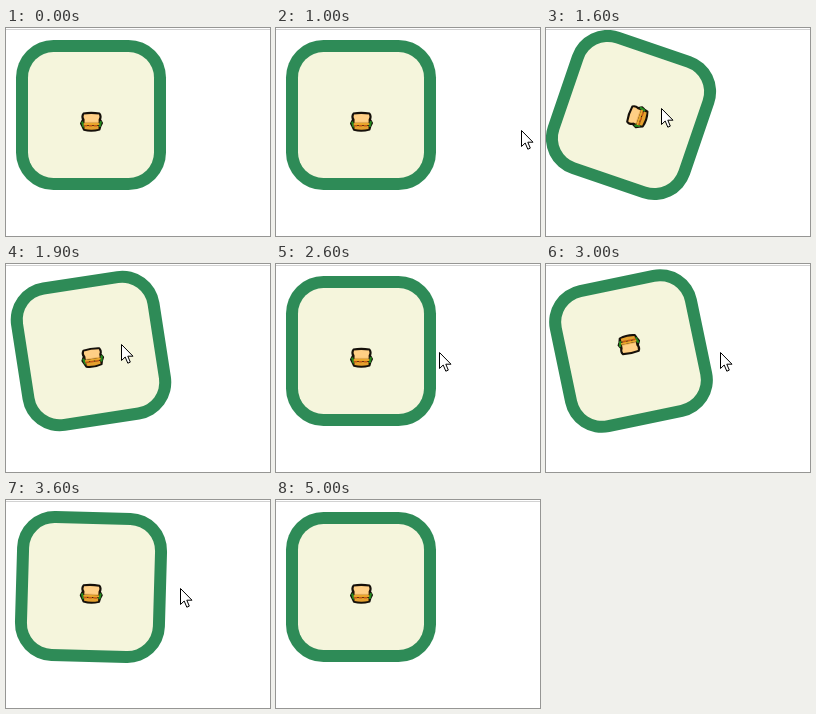
Animation, 264 px wide and 208 px high, one loop 5300 ms. Source, as an HTML page:

```html
<!DOCTYPE html>
<html lang="en">
<head>
<meta charset="utf-8">
<title>Spinning sandwich</title>
<style>
html, body { margin: 0; width: 100%; height: 100%; overflow: hidden; background: #fff; }
svg { display: block; width: 264px; height: 208px; }
</style>
</head>
<body>
<svg viewBox="0 0 264 208">
  <clipPath id="page"><path d="M0 2H264V208H0z"/></clipPath>
  <path d="M0 1.5H264" stroke="#d2d2d2"/>
  <g clip-path="url(#page)">
    <g id="card">
      <rect x="10" y="12" width="150" height="150" rx="37.5" fill="#2e8b57"/>
      <rect x="22" y="24" width="126" height="126" rx="25.5" fill="#f5f5dc"/>
      <g stroke-linejoin="round" stroke-linecap="round">
        <path d="M77.5 85.5Q85 84 93.5 85.5Q95.5 88 94 91.5L96 95L94.5 98L93.5 101.5Q85.5 104 78 101.8L76.5 98.5L75 95.5L77 91.5Q75.5 88 77.5 85.5z" fill="#2c1c08" stroke="#15100a" stroke-width="2"/>
        <path d="M76.3 94.5L77.5 98.5M94.8 94L93.8 98" stroke="#258a20" stroke-width="2.2"/>
        <path d="M78.5 98H92.5V101Q85.5 102.5 78.5 101z" fill="#e5a12e"/>
        <path d="M78.5 97.5H92.5" stroke="#c65a16" stroke-width="2" stroke-dasharray="2 3"/>
        <path d="M78.5 96H92.5" stroke="#e9a62b" stroke-width="2"/>
        <path d="M78 86.5Q85 85.3 93 86.5Q94.2 88.8 92.6 91.5V94.5H78.6V91.5Q76.8 89 78 86.5z" fill="#ffcf85"/>
        <path d="M79 94.3H92" stroke="#f5b75c"/>
      </g>
    </g>
  </g>
  <path id="pointer" d="M.5 .5V16.5L4.2 13L6.8 19.2L9.3 18.1L6.8 12.2H12z" fill="#fff" stroke="#000"/>
</svg>
<script>
const LOOP = 5300, STEP = 100, SPIN = 1000;
const card = document.getElementById('card');
const pointer = document.getElementById('pointer');

// time, x, y of the pointer tip
const path = [
  [1000, 245, 102], [1100, 158, 88], [1200, 128, 82], [1300, 115, 80],
  [2400, 115, 80], [2500, 140, 84], [2600, 163, 88], [2700, 172, 88],
  [2800, 174, 88], [4300, 174, 88]
];

const bezier = (s, a, b) => 3 * s * (1 - s) ** 2 * a + 3 * s * s * (1 - s) * b + s ** 3;

// CSS "ease": cubic-bezier(.25, .1, .25, 1)
function ease(x) {
  if (x <= 0) return 0;
  if (x >= 1) return 1;
  let lo = 0, hi = 1;
  for (let i = 0; i < 30; i++) {
    const mid = (lo + hi) / 2;
    if (bezier(mid, .25, .25) < x) lo = mid; else hi = mid;
  }
  return bezier(lo, .1, 1);
}

function pointerAt(t) {
  const i = path.findIndex(p => p[0] > t);
  const [t0, x0, y0] = path[i - 1], [t1, x1, y1] = path[i];
  const k = (t - t0) / (t1 - t0);
  return [x0 + (x1 - x0) * k, y0 + (y1 - y0) * k].map(Math.round);
}

function draw() {
  const t = Math.floor(performance.now() % LOOP / STEP) * STEP;
  const angle = 360 * (ease((t - 1100) / SPIN) - ease((t - 2690) / SPIN));
  card.setAttribute('transform', `rotate(${angle % 360} 85 87)`);

  const shown = t >= 1000 && t < 4300;
  pointer.style.display = shown ? '' : 'none';
  if (shown) pointer.setAttribute('transform', `translate(${pointerAt(t)})`);
  requestAnimationFrame(draw);
}
draw();
</script>
</body>
</html>
```
